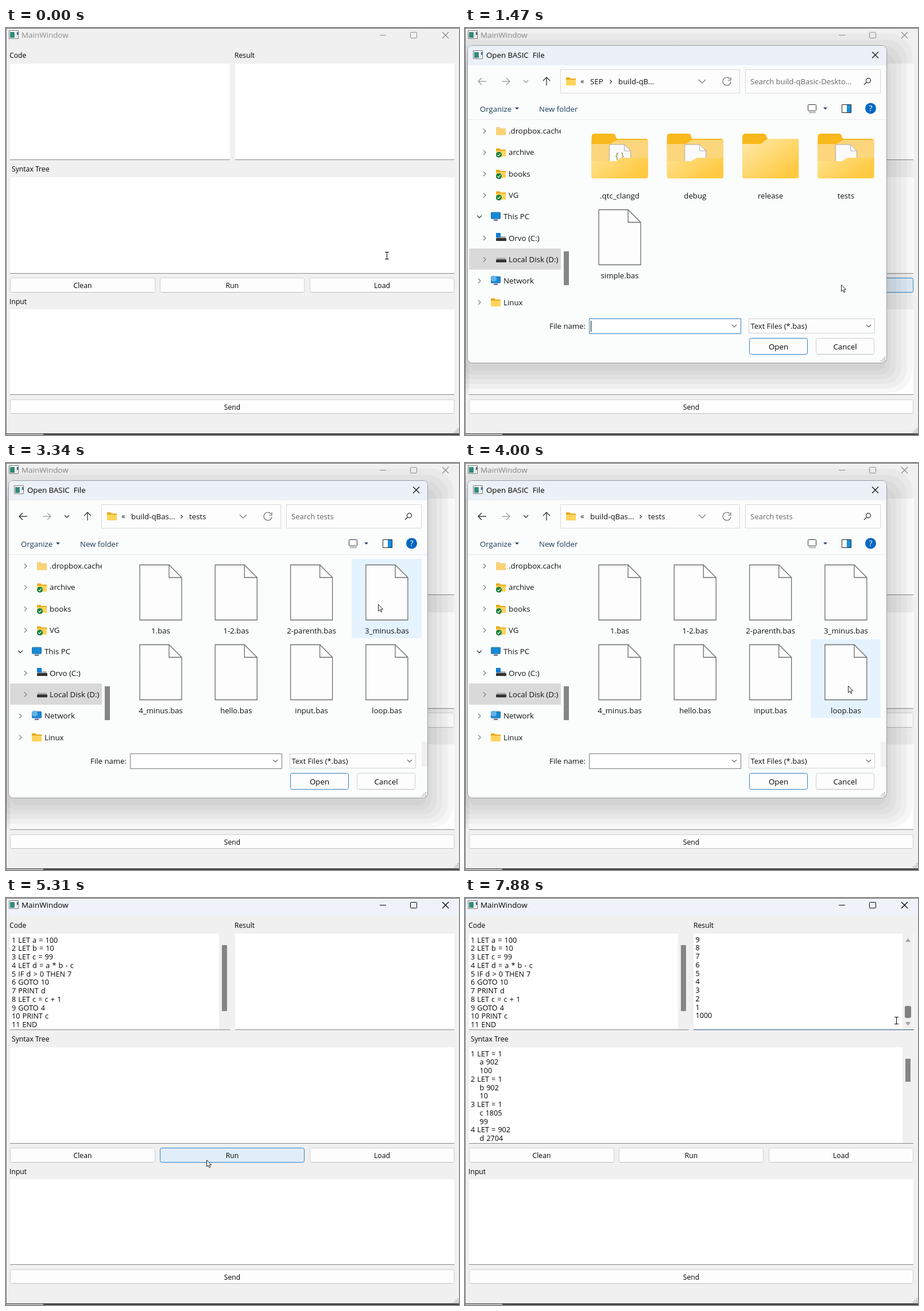
Animation, 789 px wide and 709 px high, one loop 8000 ms. Source, as an HTML page with a canvas:

```html
<!DOCTYPE html>
<html lang="en">
<head>
<meta charset="utf-8">
<title>BASIC interpreter</title>
<style>
  html, body { margin: 0; width: 100%; height: 100%; overflow: hidden; background: #f0f0f0; }
  canvas { display: block; }
</style>
</head>
<body>
<canvas id="stage" width="789" height="709"></canvas>
<script>
const ctx = document.getElementById('stage').getContext('2d');
const LOOP = 8000, LINE = 14.75, BLUE = '#0067c0', ACCENT = '#2b7fc4';
const UI = '"Open Sans", "Noto Sans", sans-serif';

// Bursts of screen updates: start, end, number of updates
const bursts = [[310, 970, 6], [1350, 2340, 8], [2510, 3490, 8], [3760, 4000, 3],
  [4320, 5310, 8], [5550, 6510, 8], [6660, 7480, 7], [7730, 7880, 2]];
const pointerKeys = [[200, 663, 396], [830, 655, 447], [1491, 655, 447], [2340, 648, 246],
  [3640, 648, 246], [4000, 667, 388], [4461, 667, 388], [5310, 349, 456], [5687, 349, 456],
  [6510, 725, 116], [6797, 725, 116], [6930, 771, 98], [7060, 771, 98], [7480, 771, 199],
  [7600, 771, 199], [7880, 751, 213]];
const scrollKeys = [[6510, 0], [6797, 559], [7060, 559], [7480, 13158]];

const program = ['1 LET a = 100', '2 LET b = 10', '3 LET c = 99', '4 LET d = a * b - c',
  '5 IF d > 0 THEN 7', '6 GOTO 10', '7 PRINT d', '8 LET c = c + 1', '9 GOTO 4', '10 PRINT c', '11 END'];
const tree = ['1 LET = 1', '>a 902', '>100', '2 LET = 1', '>b 902', '>10', '3 LET = 1',
  '>c 1805', '>99', '4 LET = 902', '>d 2704'];
const places = ['.dropbox.cache', 'archive', 'books', 'VG', 'This PC', 'Orvo (C:)',
  'Local Disk (D:)', 'Network', 'Linux'];
const tests = ['1.bas', '1-2.bas', '2-parenth.bas', '3_minus.bas',
  '4_minus.bas', 'hello.bas', 'input.bas', 'loop.bas'];

function lastUpdate(t) {
  let time = 0;
  for (const [start, end, count] of bursts) {
    if (t < start) break;
    const step = (end - start) / (count - 1);
    time = start + Math.min(count - 1, Math.floor((t - start) / step + 1e-6)) * step;
  }
  return time;
}

function track(keys, t) {
  const next = keys.findIndex(k => k[0] > t);
  if (next === 0) return keys[0].slice(1);
  if (next < 0) return keys[keys.length - 1].slice(1);
  const a = keys[next - 1], b = keys[next];
  const p = (t - a[0]) / (b[0] - a[0]);
  return a.slice(1).map((v, i) => v + (b[i + 1] - v) * p);
}

function box(x, y, w, h, fill, stroke, r = 0) {
  const inset = stroke ? 0.5 : 0;
  ctx.beginPath();
  ctx.roundRect(x + inset, y + inset, w - 2 * inset, h - 2 * inset, r);
  if (fill) { ctx.fillStyle = fill; ctx.fill(); }
  if (stroke) { ctx.strokeStyle = stroke; ctx.lineWidth = 1; ctx.stroke(); }
}

function disc(x, y, r, fill) {
  ctx.beginPath();
  ctx.arc(x, y, r, 0, 7);
  ctx.fillStyle = fill;
  ctx.fill();
}

// Path of [x, y] points relative to (x, y)
function shape(x, y, points, { fill, stroke, width = 1.2, closed = !!fill } = {}) {
  ctx.beginPath();
  points.forEach(([px, py]) => ctx.lineTo(x + px, y + py));
  if (closed) ctx.closePath();
  if (fill) { ctx.fillStyle = fill; ctx.fill(); }
  if (stroke) { ctx.strokeStyle = stroke; ctx.lineWidth = width; ctx.stroke(); }
}

function text(s, x, y, size = 13.3, color = '#111', align = 'left', space = 0) {
  ctx.font = `${size}px ${UI}`;
  ctx.fillStyle = color;
  ctx.textAlign = align;
  ctx.wordSpacing = space + 'px';
  ctx.fillText(s, x, Math.round(y + 4.6));
}

function clipped(x, y, w, h, draw) {
  ctx.save();
  ctx.beginPath();
  ctx.rect(x, y, w, h);
  ctx.clip();
  draw();
  ctx.restore();
}

function chevron(x, y, dir, color = '#666', s = 4) {
  const p = dir === 'down' ? [[-s, -s / 2], [0, s / 2], [s, -s / 2]] : [[-s / 2, -s], [s / 2, 0], [-s / 2, s]];
  shape(x, y, p, { stroke: color });
}

function arrow(x, y, angle, color) {
  ctx.save();
  ctx.translate(x, y);
  ctx.rotate(angle);
  shape(0, 0, [[-7, 0], [7, 0]], { stroke: color, width: 1.3 });
  shape(0, 0, [[1, -6], [7, 0], [1, 6]], { stroke: color, width: 1.3 });
  ctx.restore();
}

function cross(x, y, color) {
  shape(x, y, [[-5.5, -5.5], [5.5, 5.5]], { stroke: color });
  shape(x, y, [[-5.5, 5.5], [5.5, -5.5]], { stroke: color });
}

function appIcon(x, y) {
  box(x, y, 17, 15, '#fff', '#777');
  box(x + 2, y + 3, 8, 10, '#348b7c');
  box(x + 11, y + 3, 3, 10, '#e8eaec');
  box(x + 14, y + 3, 2, 5, '#35658a');
}

function grip(x, y) {
  for (let i = 0; i < 3; i++)
    for (let j = 0; j <= i; j++) box(x - j * 3, y - (2 - i) * 3, 2, 2, '#b4b4b4');
}

function button(label, x, y, w, h, { hot = false, accent = hot, size = 12.2 } = {}) {
  box(x, y, w, h, hot ? '#e0eef9' : '#fdfdfd', accent ? ACCENT : '#d0d0d0', 3);
  if (!accent) box(x + 3, y + h - 1, w - 6, 1, '#bcbcbc');
  text(label, x + w / 2, y + h / 2 + 0.5, size, '#000', 'center');
}

function textArea(x, y, w, h, focused) {
  box(x, y, w, h, '#fff');
  box(x, y + h - 1, w, 1, focused ? '#24557f' : '#868686');
}

function scrollbar(right, y, h, thumbY, thumbH, hot) {
  box(right - 19, y, 19, h, '#f0f0f0');
  if (!hot) return box(right - 14, thumbY, 9, thumbH, '#858585');
  box(right - 15, thumbY, 11, thumbH, '#808080', null, 3);
  const up = [[-4.5, 3], [0, -3.5], [4.5, 3]];
  shape(right - 9.5, 73.5, up, { fill: '#a3a3a3' });
  shape(right - 9.5, 219, up.map(([px, py]) => [px, -py]), { fill: '#a3a3a3' });
}

function lines(list, x, y) {
  list.forEach((s, i) => {
    const child = s[0] === '>';
    text(child ? s.slice(1) : s, x + (child ? 15.5 : 0), y + i * LINE, 12.6, '#000', 'left', 0.9);
  });
}

function mainWindow(s) {
  const ink = s.active ? '#000' : '#8c8c8c';
  box(0, 0, 789, 709, '#f0f0f0');
  if (s.active) box(0, 0, 789, 30, '#eff3f9');
  box(0, 0, 789, 1, '#666');
  box(0, 0, 1, 709, '#777');
  box(0, 706, 789, 2, '#777');
  box(65, 706, 724, 3, '#4a4a4a');
  appIcon(5, 4);
  text('MainWindow', 27, 12, 13.4, ink);
  shape(651, 12.5, [[0, 0], [11, 0]], { stroke: ink, width: 1 });
  box(704, 7, 12, 11, null, ink, 1);
  cross(765.5, 12.5, ink);
  grip(786, 703);

  text('Code', 6, 47.5, 12.2, '#000');
  text('Result', 398, 47.5, 12.2, '#000');
  text('Syntax Tree', 10, 245, 12.2, '#000');
  text('Input', 6, 476, 12.2, '#000');
  textArea(7, 62, 383, 168);
  textArea(s.focused ? 398 : 399, 62, s.focused ? 384 : 382, 168, s.focused);
  textArea(7, 260, 774, 168);
  textArea(7, 490, 774, 149);
  if (s.loaded) {
    lines(program, 10, 73);
    scrollbar(390, 62, 167, 82, 115);
  }
  if (s.ran) {
    clipped(7, 260, 755, 167, () => lines(tree, 10, 271));
    scrollbar(781, 260, 167, 280, 40);
    clipped(399, 62, 363, 167, () => {
      const first = Math.max(0, Math.floor(s.scroll / LINE) - 1);
      const rows = Array.from({ length: 14 }, (_, i) => first + i).filter(n => n <= 901);
      lines(rows.map(n => String(n < 901 ? 901 - n : 1000)), 401.5, 73 + first * LINE - s.scroll);
    });
    scrollbar(781, 62, 167, Math.round(83 + s.scroll / 13158 * 105), 21, s.barHot);
  }
  button('Clean', 7, 435, 253, 26);
  button('Run', 268, 435, 252, 26, { hot: s.runHot });
  button('Load', 529, 435, 252, 26, { hot: s.loadHot });
  button('Send', 7, 647, 774, 25);
}

function smallFolder(x, y) {
  shape(x, y, [[0, 0], [6, 0], [8, 2], [17, 2], [17, 14], [0, 14]], { fill: '#eba91c' });
  box(x, y + 4, 17, 10, '#ffd35c', null, 1);
}

function bigFolder(cx, content) {
  const x = cx - 49, front = ctx.createLinearGradient(x + 20, 190, x + 70, 262);
  front.addColorStop(0, '#ffe7a2');
  front.addColorStop(1, '#ffca42');
  box(x, 184, 42, 30, '#f8b91c', null, 5);
  shape(x, 184, [[35, 0], [46, 10], [35, 12]], { fill: '#f8b91c' });
  box(x, 193, 98, 69, '#f8b91c', null, 4);
  if (!content) {
    shape(x, 184, [[0, 18], [32, 18], [44, 9], [96, 9], [98, 11], [98, 76], [96, 78], [2, 78], [0, 76]], { fill: front });
    return;
  }
  shape(x, 184, [[0, 18], [32, 18], [44, 11], [98, 11], [98, 60], [0, 60]], { fill: '#fbd67c' });
  shape(cx, 203, [[-18, 0], [8, 0], [19, 11], [19, 32], [-18, 32]], { fill: '#fafafa', stroke: '#999', width: 0.8 });
  shape(cx, 203, [[8, 0], [8, 11], [19, 11]], { stroke: '#999', width: 0.8 });
  if (content === 'braces') text('{ }', cx, 222, 15, '#8c8420', 'center');
  shape(x, 226, [[0, 6], [42, 6], [52, 0], [98, 0], [98, 34], [96, 36], [2, 36], [0, 34]], { fill: front });
}

function page(cx, y) {
  const style = { fill: '#fdfdfd', stroke: '#6c6c6c', width: 1.3 };
  shape(cx - 36.5, y + 0.5, [[0, 0], [51, 0], [73, 22], [73, 96], [0, 96]], style);
  shape(cx + 14.5, y + 0.5, [[0, 0], [0, 22], [22, 22]], { stroke: '#6c6c6c', width: 1.3 });
}

function sidebar() {
  box(7, 384, 160, 37, '#d9d9d9');
  places.forEach((name, i) => {
    const y = 179.5 + i * 37.3, root = i === 4 || i > 6, x = root ? 45 : 54;
    chevron(root ? 25 : 34, y, i === 4 ? 'down' : 'right', i === 4 ? '#222' : '#777');
    if (i < 4 || i === 8) {
      ctx.globalAlpha = i ? 1 : 0.5;
      smallFolder(x, y - 7);
      ctx.globalAlpha = 1;
      if (i > 0 && i < 4) {
        disc(59, y + 4, 5, '#15803c');
        shape(59, y + 4, [[-2.5, 0], [-0.5, 2], [2.5, -2]], { stroke: '#fff' });
      }
    } else if (root) {
      box(x, y - 8, 17, 12, '#1689d6', '#2470a4', 1);
      box(x + 5, y + 5, 7, 2, '#557');
      if (i === 7) disc(x + 5, y - 4, 5, '#64b5e8');
    } else {
      box(55, y - 3, 16, 4, '#aaa', null, 1);
      box(54, y, 18, 5, '#333', null, 1);
      if (i === 5) box(54, y - 9, 8, 8, '#0a7fd8');
    }
    clipped(0, y - 15, 167, 30, () => text(name, root ? 67 : 76, y));
  });
  box(172, 389, 9, 59, '#858585');
}

function addressBar(s) {
  arrow(30, 93, Math.PI, s.inTests ? '#222' : '#999');
  arrow(71, 93, 0, '#999');
  chevron(106, 93, 'down', s.inTests ? '#222' : '#888');
  arrow(142, 93, -Math.PI / 2, '#333');
  box(166, 72, 313, 42, '#fdfdfd', '#d9d9d9');
  box(488, 72, 236, 42, '#fdfdfd', '#d9d9d9');
  smallFolder(176, 86);
  text('«', 201, 92, 13);
  if (s.inTests) {
    text('build-qBas...', 218, 93);
    chevron(306, 93.5, 'right', '#333', 3);
    text('tests', 319, 93);
  } else {
    text('SEP', 218, 93);
    chevron(254, 93.5, 'right', '#333', 3);
    text(s.opening ? 'build-...' : 'build-qB...', 267, 93);
    if (s.opening) chevron(324.5, 93.5, 'right', '#333', 3);
  }
  chevron(413, 93, 'down', '#777', 6);
  ctx.beginPath();
  ctx.arc(456, 93, 7, 0.1, 5.6);
  ctx.strokeStyle = '#666';
  ctx.lineWidth = 1.2;
  ctx.stroke();
  shape(463, 86, [[0, 0], [0, 5], [-5, 5]], { stroke: '#666' });
  text(s.inTests ? 'Search tests' : 'Search build-qBasic-Deskto...', 497, 93.5, 13.1, '#666');
  ctx.beginPath();
  ctx.arc(702.5, 91.5, 4, 0, 7);
  ctx.strokeStyle = '#444';
  ctx.lineWidth = 1.4;
  ctx.stroke();
  shape(699.5, 94.5, [[0, 0], [-4.5, 4.5]], { stroke: '#444', width: 1.6 });
}

function toolbar() {
  const caret = [[-3.5, -1.5], [3.5, -1.5], [0, 2]];
  text('Organize', 26, 141, 13.2, '#1b3b5c');
  shape(90.5, 140, caret, { fill: '#1b3b5c' });
  text('New folder', 129, 141, 13.2, '#1b3b5c');
  box(597, 133, 15, 12, '#fff', '#333', 1);
  box(599, 147, 12, 1, '#777');
  shape(627.5, 140, caret, { fill: '#1b3b5c' });
  box(656, 133, 17, 15, '#fff', '#222');
  box(665, 134, 7, 13, '#1690df');
  disc(706.5, 140, 9.5, BLUE);
  text('?', 706.5, 140.5, 14, '#fff', 'center');
  box(5, 159, 729, 1, '#e6e8ea');
}

function fileList(s) {
  const column = i => 269.5 + i * 131.3;
  if (s.opening) {
    box(219, 167, 505, 319, '#fff');
    box(219, 486, 505, 43, '#f0f0f0');
  }
  if (s.inTests) box(724, 486, 10, 43, '#f0f0f0');
  if (s.hotRow === 0) box(602, 167, 122, 138, '#e5f3ff');
  if (s.hotRow === 1 && s.inTests) box(602, 307, 122, 137, s.picked ? '#cce8ff' : '#e5f3ff');
  if (s.inTests) {
    tests.forEach((name, i) => {
      const row = Math.floor(i / 4), cx = column(i % 4);
      page(cx, 177 + row * 139);
      text(name, cx, 292 + row * 139, 13.2, '#111', 'center');
    });
    return;
  }
  ['.qtc_clangd', 'debug', 'release', 'tests'].forEach((name, i) => {
    bigFolder(column(i), ['braces', 'page', null, 'page'][i]);
    text(name, column(i), 292, 13.2, '#111', 'center');
  });
  page(column(0), 316);
  text('simple.bas', column(0), 431, 13.2, '#111', 'center');
}

// Stepped shadow, deepest below the dialog and faint above it
function dropShadow() {
  for (let d = 46; d > 0; d -= 8) {
    const side = d * 1.2 - 10, top = 72 - d * 1.35;
    box(4 - side, top, 730 + 2 * side, 590 + d - top, 'rgba(0,0,0,0.032)', null, 8 + d * 0.7);
  }
}

function dialog(s) {
  dropShadow();
  // The lower button stays above the shadow
  button('Send', 7, 647, 774, 25);
  box(4, 30, 731, 554, '#fbfcfc', '#9a9a9a', 8);
  box(5, 31, 729, 34, '#ebf1f7', null, [7, 7, 0, 0]);
  appIcon(14, 39);
  text('Open BASIC  File', 37, 47, 13.3, '#000');
  cross(714.5, 47, '#111');
  addressBar(s);
  toolbar();
  sidebar();
  fileList(s);
  text('File name:', 210, 519.5, 13.2, '#111', 'right');
  box(216, 506, 265, 27, '#fff', s.inTests ? '#7a7a7a' : ACCENT);
  if (!s.inTests) box(219, 510, 1, 19, '#000');
  if (s.picked) text('loop.bas', 220, 519.5, 13.2);
  chevron(469, 519, 'down');
  box(494, 506, 220, 26, '#fdfdfd', '#cfcfcf');
  text('Text Files (*.bas)', 497.5, 519.5, 13);
  chevron(703, 519, 'down');
  button('Open', 495, 540, 102, 29, { accent: true, size: 13.3 });
  button('Cancel', 611, 540, 102, 29, { size: 13.3 });
  grip(730, 579);
}

function pointer(x, y, beam) {
  x = Math.round(x);
  y = Math.round(y);
  if (beam) {
    box(x, y - 6, 1, 13, '#000');
    box(x - 3, y - 6, 7, 1, '#000');
    box(x - 3, y + 6, 7, 1, '#000');
    return;
  }
  shape(x + 0.5, y + 0.5, [[0, 0], [0, 11.5], [2.6, 9], [4.6, 13.2], [6.4, 12.4], [4.5, 8.3], [8, 8.3]],
    { fill: '#fff', stroke: '#222', width: 1 });
}

function render(now) {
  const t = now % LOOP, q = lastUpdate(t);
  const [x, y] = track(pointerKeys, q);
  const open = q >= 1350 && q < 4450;
  const onButtons = y > 435 && y < 461;
  const state = {
    active: q >= 830 && !open,
    loaded: q >= 4450,
    ran: q >= 5680,
    scroll: track(scrollKeys, q)[0],
    barHot: q >= 6920,
    focused: q >= 7000,
    loadHot: t < 1620 && onButtons && x > 529,
    runHot: !open && onButtons && x > 268 && x < 520,
    opening: t >= 2510 && t < 2890,
    inTests: t >= 2890,
    picked: t >= 4320,
    hotRow: y < 305 ? 0 : y < 444 ? 1 : -1
  };
  mainWindow(state);
  if (open) dialog(state);
  const overText = x < 762 && ((y > 62 && y < 230) || (y > 260 && y < 428));
  pointer(x, y, !open && overText);
  requestAnimationFrame(tick);
}

const began = performance.now();
function tick() { render(performance.now() - began); }
tick();
</script>
</body>
</html>
```
